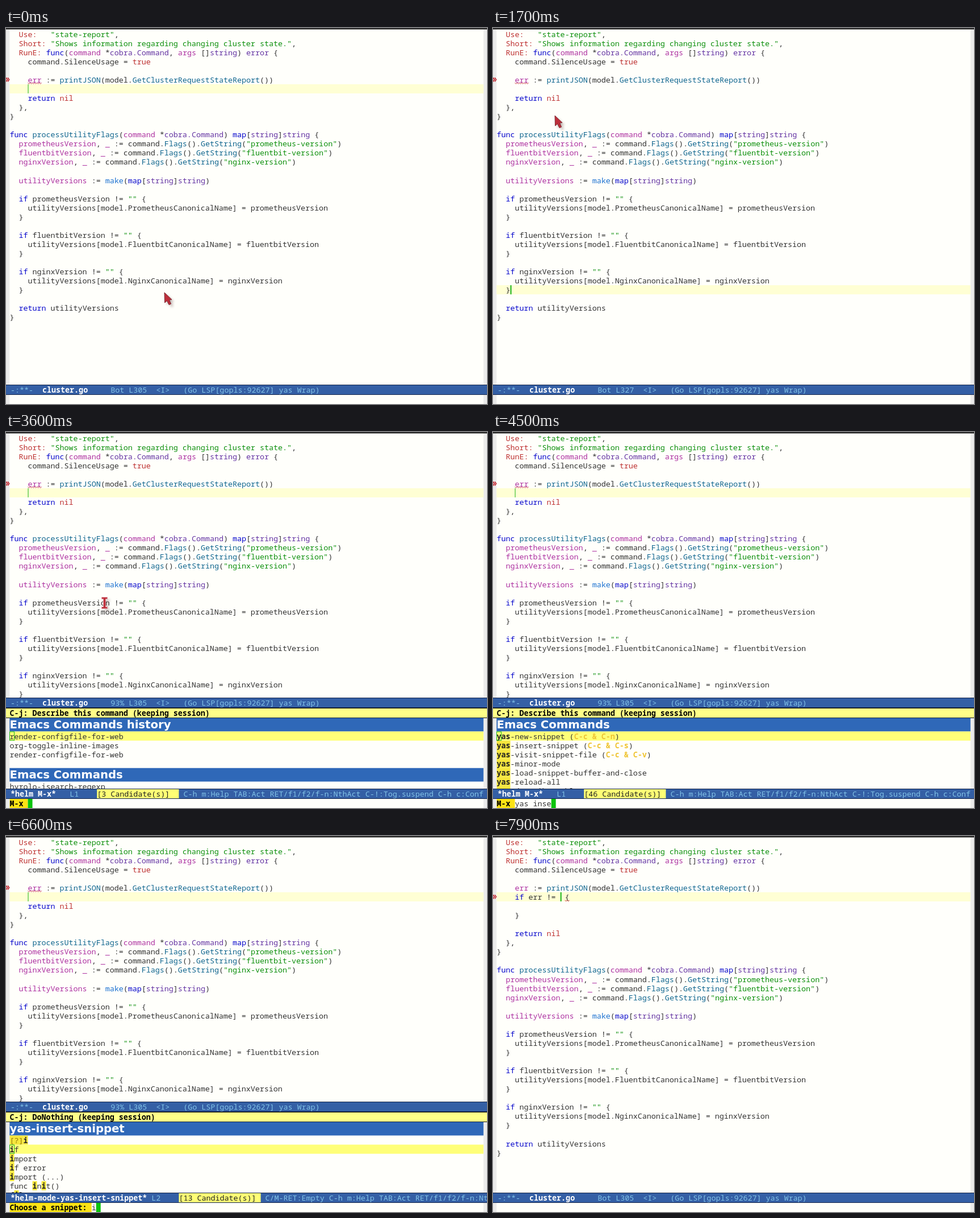
Animation of 847x661 px, one loop 8 s. Source, as an HTML page with a canvas:

```html
<!DOCTYPE html>
<html lang="en">
<head>
<meta charset="utf-8">
<title>Editor snippet demo</title>
<style>
  html, body { margin: 0; width: 100%; height: 100%; overflow: hidden; }
  canvas { display: block; }
</style>
</head>
<body>
<canvas id="stage" width="847" height="661"></canvas>
<script>
const ctx = document.getElementById('stage').getContext('2d', { alpha: false });
const W = 847, H = 661, LOOP = 8000;
const CELL = 8.01, ROW = 16.06, LEFT = 6.5, FRINGE = 6.3, RIGHT = 840.8;
const PAPER = '#fffffb', INK = '#333333', BLUE = '#345fa5', GREEN = '#17b317';
const YELLOW = '#f6e63c', GOLD = '#fde314';

const CODE = `  Use:   "state-report",
  Short: "Shows information regarding changing cluster state.",
  RunE: func(command *cobra.Command, args []string) error {
    command.SilenceUsage = true

    err := printJSON(model.GetClusterRequestStateReport())

    return nil
  },
}

func processUtilityFlags(command *cobra.Command) map[string]string {
  prometheusVersion, _ := command.Flags().GetString("prometheus-version")
  fluentbitVersion, _ := command.Flags().GetString("fluentbit-version")
  nginxVersion, _ := command.Flags().GetString("nginx-version")

  utilityVersions := make(map[string]string)

  if prometheusVersion != "" {
    utilityVersions[model.PrometheusCanonicalName] = prometheusVersion
  }

  if fluentbitVersion != "" {
    utilityVersions[model.FluentbitCanonicalName] = fluentbitVersion
  }

  if nginxVersion != "" {
    utilityVersions[model.NginxCanonicalName] = nginxVersion
  }

  return utilityVersions
}`.split('\n');

const SYNTAX = /(?<string>"[^"]*")|(?<keyword>\b(?:func|if|return|map)\b)|(?<constant>\b(?:true|nil)\b|^ +\w+:(?= ))|(?<type>cobra\.Command|\bstring\b|\berror\b)|(?<builtin>\bmake\b)|(?<variable>\b\w+(?=, _| :=| \*| \[\]))|(?<call>\w+(?=\())/g;
const STYLES = {
  string: { color: '#0c8f0c' }, keyword: { color: '#0808cc' }, constant: { color: '#bd3030' },
  type: { color: '#6434a3' }, builtin: { color: '#1a70d0' }, variable: { color: '#ad30a0' },
  call: { color: '#10668f' },
  key: { color: '#efc432', bold: true },
  fresh: { color: '#957a08', back: YELLOW },
  match: { color: '#222', bold: true, back: YELLOW },
  picked: { color: '#222', bold: true }
};

const HELP = 'C-h m:Help TAB:Act RET/f1/f2/f-n:NthAct C-!:Tog.suspend C-h c:Conf';
const HISTORY = ['render-configfile-for-web', 'org-toggle-inline-images', 'render-configfile-for-web'];
const YAS = ['yas-new-snippet (C-c & C-n)', 'yas-insert-snippet (C-c & C-s)', 'yas-visit-snippet-file (C-c & C-v)',
  'yas-minor-mode', 'yas-load-snippet-buffer-and-close', 'yas-reload-all', 'yas-describe-tables'];
const INSERT = ['yas-insert-snippet (C-c & C-s)', 'yas/insert-snippet'];
const SNIPPETS = ['const', 'for', 'func', 'if', 'import', 'if error', 'import (...)'];
const I_SNIPPETS = ['[?]i', 'if', 'import', 'if error', 'import (...)', 'func init()', 'filter'];

const COMMAND_KEYS = [[3600, ''], [4000, 'y'], [4100, 'ya'], [4200, 'yas'], [4500, 'yas inse'],
  [4700, 'yas inser'], [4800, 'yas insert']];
const SNIPPET_KEYS = [[5700, ''], [6400, 'i'], [6700, 'if']];
const CONDITION_KEYS = [[6900, ''], [7000, 'e'], [7100, 'er'], [7200, 'err '], [7300, 'err !'],
  [7400, 'err !='], [7500, 'err != ']];
const POINTER = [[1000, 279, 465], [1400, 185, 300], [1700, 109, 154], [1900, 96, 109], [2000, 96, 109],
  [2100, 95, 104], [2200, 95, 104], [2300, 98, 113], [2400, 98, 113], [2500, 140, 215], [2600, 173.5, 300.5]];

const latest = (t, steps) => steps.filter(([start]) => start <= t).pop()[1];

function rect(x, y, w, h, color) {
  ctx.fillStyle = color;
  ctx.fillRect(x, y, w, h);
}

function write(x, y, str, { color = INK, bold = false, back } = {}) {
  if (back) rect(x, y - 13, str.length * CELL, 16, back);
  ctx.font = `${bold ? 'bold ' : ''}13.35px "Noto Sans Mono", monospace`;
  ctx.fillStyle = color;
  ctx.fillText(str, x, y);
}

// Writes one line, giving each named group of the pattern its own style.
function writeStyled(x, y, str, pattern, styles = STYLES) {
  let col = 0;
  const put = (part, name) => {
    write(x + col * CELL, y, part, styles[name]);
    col += part.length;
  };
  for (const m of str.matchAll(pattern)) {
    put(str.slice(col, m.index));
    put(m[0], Object.keys(m.groups).find(name => m.groups[name]));
  }
  put(str.slice(col));
}

function clipped(top, bottom, draw) {
  ctx.save();
  ctx.beginPath();
  ctx.rect(0, top, W, bottom - top);
  ctx.clip();
  draw();
  ctx.restore();
}

function squiggle(x, y, width) {
  ctx.beginPath();
  for (let i = 0; i <= width; i += 2) ctx.lineTo(x + i, y + (i % 4 ? 2 : 0));
  ctx.strokeStyle = '#c8323a';
  ctx.lineWidth = 1;
  ctx.stroke();
}

function fringeMark(y) {
  ctx.strokeStyle = '#c01f2a';
  ctx.lineWidth = 1.6;
  for (const x of [0, 3]) {
    ctx.beginPath();
    ctx.moveTo(x, y - 3.5);
    ctx.lineTo(x + 2.6, y);
    ctx.lineTo(x, y + 3.5);
    ctx.stroke();
  }
}

function bar(y, color, border) {
  rect(0, y, W, 18, border);
  rect(0, y + 1, W, 16, color);
}

// Parts are [column, text, style].
function modeline(y, parts) {
  bar(y, BLUE, '#17284c');
  for (const [col, str, style] of parts) write(8 + col * CELL, y + 14, str, { color: '#82c3e8', ...style });
}

const TITLE = { color: '#fff', bold: true };

function fileModeline(y, place, line) {
  modeline(y, [[0, '-:**-'], [7, 'cluster.go', TITLE],
    [22, `${place} L${line}  <I>   (Go LSP[gopls:92627] yas Wrap)`]]);
}

function drawEditor(t, bottom) {
  const lines = [...CODE];
  const clickedLow = t >= 500 && t < 2300;
  const row = clickedLow ? 28 : 6;
  let col = clickedLow ? 3 : 4;
  if (t >= 6900) {
    const condition = latest(t, CONDITION_KEYS);
    lines.splice(6, 1, `    if ${condition} {`, '', '    }', '');
    col = 7 + condition.length;
  }
  const top = r => 2.5 + r * ROW;
  clipped(0, bottom, () => {
    rect(FRINGE, top(row), RIGHT - FRINGE, ROW, '#ffffd4');
    lines.forEach((line, r) => writeStyled(LEFT, top(r) + 13.1, line, SYNTAX));

    const checked = t >= 7900;
    if (checked) squiggle(LEFT + 15 * CELL, top(6) + 14, 8);
    else squiggle(LEFT + 4 * CELL, top(5) + 13.5, 24);
    fringeMark(top(checked ? 6 : 5) + 8);

    const hidden = (t >= 1100 && t < 1600) || (t >= 2800 && t < 3300);
    const focused = (t >= 500 && t < 3600) || t >= 6900;
    if (!hidden) rect(LEFT + col * CELL, top(row), focused ? 2 : 1, ROW, GREEN);
  });
}

function helmHeader(y, str) {
  rect(FRINGE, y, RIGHT - FRINGE, 23.8, '#2f68b8');
  ctx.font = 'bold 19.66px "DejaVu Sans", sans-serif';
  ctx.fillStyle = '#fff';
  ctx.fillText(str, LEFT, y + 18);
}

function drawHelm(t) {
  const snippet = t >= 5700;
  const typed = latest(t, snippet ? SNIPPET_KEYS : COMMAND_KEYS);
  const filtered = snippet ? t >= 6500 : t >= 4200;
  const narrowed = t >= 4900;
  const items = snippet ? (filtered ? I_SNIPPETS : SNIPPETS) : !filtered ? HISTORY : narrowed ? INSERT : YAS;
  const words = snippet ? 'i' : narrowed ? 'yas|insert' : 'yas';
  const count = snippet ? (filtered ? 13 : 26) : !filtered ? 3 : narrowed ? 2 : 46;
  const selected = t >= 6600 ? 1 : 0;

  bar(485, '#ffff88', '#111');
  write(LEFT, 499, `C-j: ${snippet ? 'DoNothing' : 'Describe this command'} (keeping session)`, { color: '#000', bold: true });

  clipped(502, 627, () => {
    const top = r => 526.5 + r * ROW;
    helmHeader(502.7, snippet ? 'yas-insert-snippet' : filtered ? 'Emacs Commands' : 'Emacs Commands history');
    rect(FRINGE, top(selected), RIGHT - FRINGE, ROW, '#ffff78');
    const pattern = new RegExp(`(?<key>C-c & C-\\w)|(?<fresh>\\[\\?\\])${filtered ? `|(?<match>${words})` : ''}`, 'g');
    items.forEach((item, r) => {
      const styles = r === selected ? { ...STYLES, match: STYLES.picked } : STYLES;
      writeStyled(LEFT, top(r) + 13, item, pattern, styles);
    });
    ctx.strokeStyle = GREEN;
    ctx.lineWidth = 1;
    ctx.strokeRect(LEFT, top(selected) + .5, CELL, ROW - 1);
    if (items === HISTORY) {
      helmHeader(top(4), 'Emacs Commands');
      write(LEFT, top(4) + 23.8 + 13, 'hyrolo-isearch-regexp');
    }
  });

  const name = snippet ? '*helm-mode-yas-insert-snippet*' : '*helm M-x*';
  const countCol = snippet ? 37 : 19;
  const help = snippet ? ('C/M-RET:Empty ' + HELP).slice(0, 49) : HELP;
  modeline(627, [[0, name, TITLE], [snippet ? 31 : 13, `L${selected + 1}`],
    [countCol, `[${count} Candidate(s)]`.padEnd(18), { color: '#222', back: '#ffff75' }],
    [countCol + 19, help]]);

  const prompt = snippet ? 'Choose a snippet: ' : 'M-x ';
  const inputX = LEFT + prompt.length * CELL;
  write(LEFT, 658, prompt, { color: '#000', bold: true, back: GOLD });
  write(inputX, 658, typed);
  rect(inputX + typed.length * CELL, 645, CELL, ROW, '#0cc40c');
}

const ARROW = new Path2D('M0 0L.5 18L4.5 14.5L8 21.5L11.5 20L8.5 13L13 12.5Z');
const IBEAM = new Path2D('M-5 -10H5V-7H2V7H5V10H-5V7H-2V-7H-5Z');

function drawPointer(t) {
  const time = Math.floor(t / 100) * 100;
  const next = POINTER.findIndex(p => p[0] > time);
  let [, x, y] = POINTER[next < 0 ? POINTER.length - 1 : Math.max(next - 1, 0)];
  if (next > 0) {
    const [a, b] = [POINTER[next - 1], POINTER[next]];
    const u = (time - a[0]) / (b[0] - a[0]);
    x += (b[1] - a[1]) * u;
    y += (b[2] - a[2]) * u;
  }
  const shape = t < 2500 ? ARROW : IBEAM;
  ctx.save();
  ctx.translate(x, y);
  ctx.shadowColor = 'rgba(60,20,20,.3)';
  ctx.shadowBlur = 4;
  ctx.shadowOffsetX = 4;
  ctx.shadowOffsetY = 4;
  ctx.fillStyle = '#bd2f3b';
  ctx.fill(shape);
  ctx.shadowColor = 'transparent';
  ctx.strokeStyle = shape === ARROW ? '#7d2730' : '#e0a0a4';
  ctx.lineWidth = 1;
  ctx.stroke(shape);
  ctx.restore();
}

function draw(t) {
  const helm = t >= 3600 && t < 6900;
  rect(0, 0, W, H, '#ebebeb');
  rect(FRINGE, 0, RIGHT - FRINGE, H, PAPER);
  drawEditor(t, helm ? 467 : 627);
  rect(0, 0, W, 2.5, '#292929');
  if (helm) {
    fileModeline(467, '93%', 305);
    drawHelm(t);
  } else {
    fileModeline(627, 'Bot', t >= 500 && t < 2300 ? 327 : 305);
  }
  if (t < 4000) drawPointer(t);
}

const start = performance.now();
function tick() {
  draw((performance.now() - start) % LOOP);
  requestAnimationFrame(tick);
}
tick();
</script>
</body>
</html>
```
